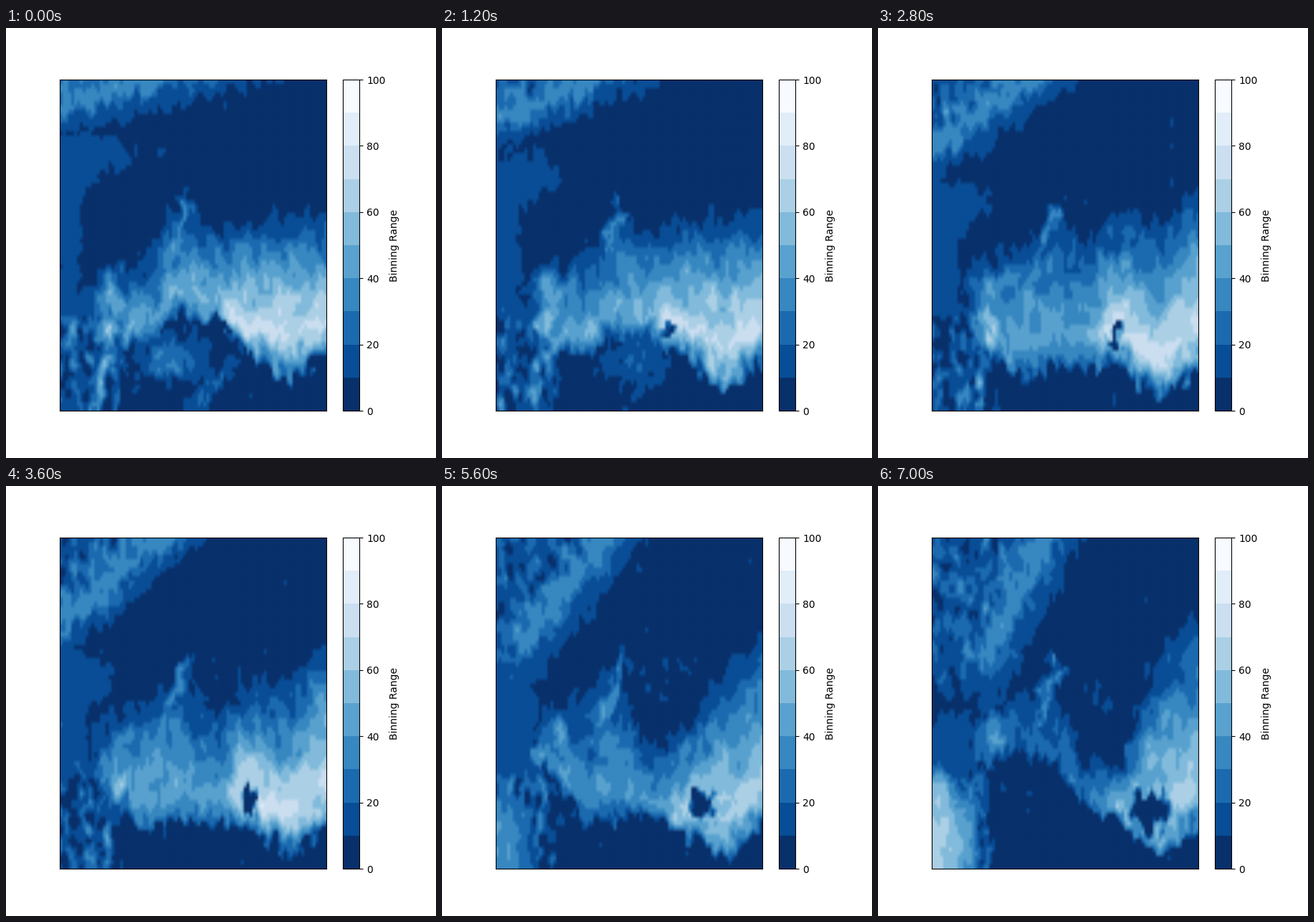
A matplotlib script that plays this animation: 600 px wide and 600 px high, repeating every 7200 ms.

```python
import numpy as np
import matplotlib.pyplot as plt
from matplotlib.animation import FuncAnimation
from matplotlib.colors import Normalize

FRAMES, STEP_MS = 36, 200
LEFT, RIGHT, TOP, BOTTOM = 75, 447, 72, 534
NX, NY = 93, 77
X, Y = np.meshgrid(np.linspace(LEFT + 2, RIGHT - 2, NX),
                   np.linspace(TOP + 3, BOTTOM - 3, NY))

# Upper and lower edge of the main plume at a few stations and moments.
STATIONS = [120, 150, 200, 240, 290, 340, 395, 447]
MOMENTS = [0, 14, 28, 35]
UPPER = np.array([[420, 358, 315, 243, 285, 272, 262, 255],
                  [355, 325, 300, 265, 285, 255, 270, 220],
                  [345, 318, 278, 255, 365, 340, 262, 205],
                  [345, 305, 285, 262, 390, 375, 225, 168]])
LOWER = np.array([[440, 450, 437, 403, 412, 465, 488, 460],
                  [420, 455, 490, 475, 478, 470, 528, 475],
                  [385, 400, 470, 465, 460, 485, 520, 478],
                  [385, 390, 370, 380, 445, 480, 515, 480]])

rng = np.random.default_rng(11)


def blur(a, across, down):
    """Smooth along each axis the given number of times."""
    for axis, times in ((1, across), (0, down)):
        for _ in range(times):
            a = (np.roll(a, 1, axis) + 2 * a + np.roll(a, -1, axis)) / 4
    return a


def noise_pair(across, down):
    pair = [blur(rng.standard_normal((NY, NX)), across, down) for _ in range(2)]
    return [n / n.std() for n in pair]


GRAIN = noise_pair(1, 2)
SWELL = noise_pair(8, 6)
SHIFT_X = noise_pair(2, 2)
SHIFT_Y = noise_pair(1, 4)


def evolve(pair, frame):
    turn = 0.2 * frame
    return np.cos(turn) * pair[0] + np.sin(turn) * pair[1]


def ramp(v, start, end):
    u = np.clip((v - start) / (end - start), 0, 1)
    return u * u * (3 - 2 * u)


def bump(x, y, cx, cy, rx, ry):
    return np.exp(-((x - cx) / rx) ** 2 - ((y - cy) / ry) ** 2)


def stroke(x, y, start, end, width):
    """Soft line: 1 on the segment, falling to 0 away from it."""
    (x0, y0), (dx, dy) = start, np.subtract(end, start)
    u = np.clip(((x - x0) * dx + (y - y0) * dy) / (dx * dx + dy * dy), 0, 1)
    gap = np.hypot(x - x0 - u * dx, y - y0 - u * dy)
    return np.exp(-(gap / width) ** 2)


def edge(x, keys, frame):
    now = [np.interp(frame, MOMENTS, column) for column in keys.T]
    return np.interp(x, STATIONS, now)


def plume(x, y, frame, t):
    upper, lower = edge(x, UPPER, frame), edge(x, LOWER, frame)
    ridge = upper + (0.75 + 0.06 * t ** 4) * (lower - upper)
    west, east = 4.3 - 2.4 * t ** 3, 6.9 - t
    peak = west + (east - west) * ramp(x, 295 - 10 * t, 325 + 40 * t ** 3)
    rise = np.clip((y - upper) / (ridge - upper), 0, 1)
    fall = np.clip((lower - y) / (lower - ridge), 0, 1) ** 0.6
    body = 0.5 + (peak - 0.3) * np.minimum(rise, fall)
    return body * ((y > upper) & (y < lower)) * ramp(x, 115, 140)


def arc(x, y, t):
    """Band in the upper left that swings down around its top end."""
    angle = np.radians(15 + 48 * t)
    dx, dy = x - (195 + 40 * t), y - TOP
    along = dy * np.sin(angle) - dx * np.cos(angle)
    off = dx * np.sin(angle) + dy * np.cos(angle)
    level = np.interp(off, [-60, -15, 0, 12, 20, 44, 46], [1.2, 2.3, 3.2, 2.5, 1.5, 0.6, 0])
    level = np.minimum(level, np.interp(along, [180, 205, 245, 265], [4, 1.3, 1, 0]))
    wake = ramp(-off, 0, 25) * ramp(-along, -265, -240)
    return level, wake


def veil(x, y, t):
    """Thin layer along the left side, sinking from the top."""
    top = 150 + 165 * t
    reach = 105 + 20 * t + 75 * (1 - t) * np.exp(-((y - top - 30) / 28) ** 2)
    reach = reach + (45 - 20 * t) * ramp(y, 375, 410)
    return 1.0 * ((x < reach) & (y > top))


def corner(x, y, t):
    growth = np.clip((t - 0.5) / 0.5, 0, 1)
    size = 0.5 + 0.5 * growth
    far = ((x - 75) / (80 * size)) ** 2 + ((y - 520) / (135 * size)) ** 4
    return 5.8 * growth * np.clip(1 - far, 0, 1)


def levels(frame):
    t = frame / (FRAMES - 1)
    x = X + 3 * evolve(SHIFT_X, frame)
    y = Y + 7 * evolve(SHIFT_Y, frame)

    body = plume(x, y, frame, t)
    band, wake = arc(x, y, t)
    early = np.clip(1 - 2.5 * t, 0, 1)
    layers = [
        body, band, veil(x, y, t), corner(x, y, t),
        (4.3 - t) * bump(x, y, 150 + 18 * t, 380 - 35 * t, 26, 32),
        2.9 * stroke(x, y, (250, 252), (214, 350), 9),
        3.3 * (1 - 0.9 * t) * stroke(x, y, (158, 420), (122, 525), 14),
        2.6 * early * bump(x, y, 230 + 250 * t, 462, 42, 28),
        1.6 * early * stroke(x, y, (314, 468), (262, 530), 13),
    ]
    size = 11 + 16 * t ** 3
    hole = bump(x, y, 302 + 76 * t, 415 + 38 * t, size, size)
    level = np.max(layers, axis=0) * (1 - ramp(hole, 0.2, 0.6))

    floor = ramp(y, 385, 420) * ramp(-x, -175, -145)
    rough = (0.18 + 0.45 * wake + 0.7 * floor * (1 - ramp(corner(x, y, t), 0.5, 2))
             + 0.25 * bump(x, y, 310, 285, 50, 60) * ramp(t, 0.2, 0.5))
    level = level + rough * evolve(GRAIN, frame)
    level = level + 0.3 * evolve(SWELL, frame) * ramp(body, 0.5, 2)
    return np.clip(np.rint(level), 0, 9).astype(int)


cmap = plt.get_cmap("Blues_r", 10)
fig, ax = plt.subplots(figsize=(6, 6), dpi=100)
image = ax.imshow(cmap(levels(0)), aspect="auto", interpolation="bilinear",
                  extent=(LEFT, RIGHT, BOTTOM, TOP))
ax.set_xticks([])
ax.set_yticks([])
scale = plt.cm.ScalarMappable(Normalize(0, 100), cmap)
fig.colorbar(scale, ax=ax, label="Binning Range", ticks=range(0, 101, 20))


def draw(frame):
    image.set_data(cmap(levels(frame)))
    return [image]


anim = FuncAnimation(fig, draw, frames=FRAMES, interval=STEP_MS, repeat=True)
plt.show()
```
